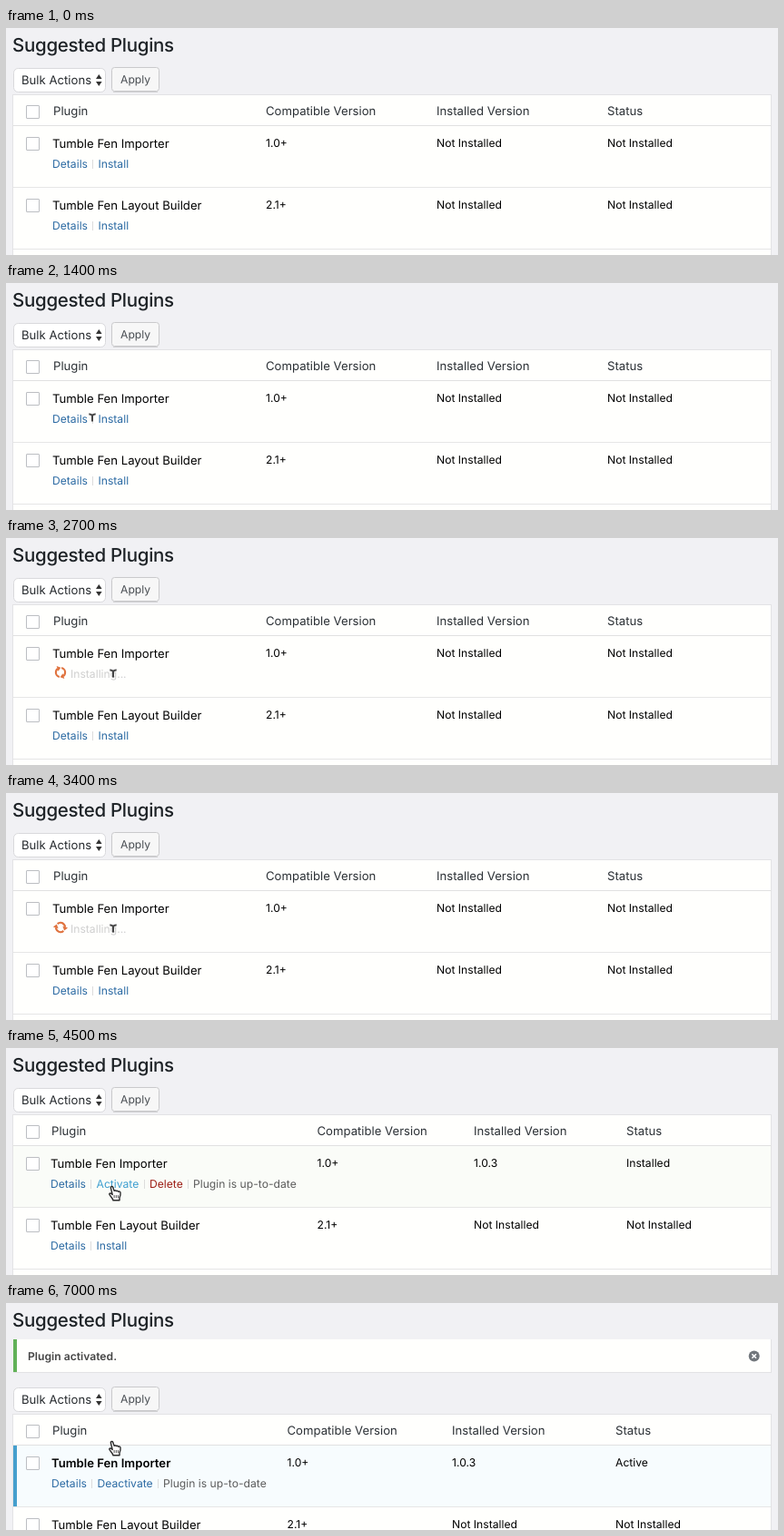
Recreate the animation shown at these times as an HTML page with a canvas. Size 850x250 px, loop 8000 ms.

```html
<!DOCTYPE html>
<html lang="en">
<head>
<meta charset="utf-8">
<title>Suggested Plugins</title>
<style>
html, body { margin: 0; width: 100%; height: 100%; overflow: hidden; background: #f1f1f4; }
canvas { display: block; }
</style>
</head>
<body>
<canvas id="stage" width="850" height="250"></canvas>
<script>
const ctx = document.getElementById('stage').getContext('2d');
const LOOP = 8000, STEP = 100;
const LINK = '#2b6aa3', HOVER = '#3f9fd0', FOCUS = '#1b3f5c', DELETE = '#9c1c14';
const PAPER = '#fffffd', SPIN = '#e0733f';
const BODY = 12.15, LABEL = 13.15;
const BRAND = 'Tumble Fen';

// Column positions: link text, header, version, installed, status
const COLS = {
  fresh: [51, 52, 286, 474, 662],
  installed: [49, 50, 342.5, 515, 683],
  active: [50, 51, 309.5, 491, 671]
};

// Pointer stops, one per step from 1100 ms
const PATH = [[204, 238], [160, 196], [112, 160], [95, 151], [104, 152], [113, 152], [118, 152]];

ctx.textRendering = 'geometricPrecision';

function text(str, x, y, size = BODY, color = '#000', weight = 400) {
  ctx.font = `${weight} ${size}px Inter, Roboto, sans-serif`;
  ctx.fillStyle = color;
  ctx.fillText(str, x, y);
}

function rect(x, y, w, h, color) {
  ctx.fillStyle = color;
  ctx.fillRect(x, y, w, h);
}

function box(x, y, w, h, r, fill, stroke) {
  ctx.beginPath();
  ctx.roundRect(x + 0.5, y + 0.5, w - 1, h - 1, r);
  ctx.fillStyle = fill;
  ctx.fill();
  ctx.lineWidth = 1;
  ctx.strokeStyle = stroke;
  ctx.stroke();
}

function poly(points, color) {
  ctx.beginPath();
  points.forEach(([x, y]) => ctx.lineTo(x, y));
  ctx.closePath();
  ctx.fillStyle = color;
  ctx.fill();
}

function separator(x, y) {
  rect(x, y - 9, 1, 10, '#dcdcdc');
}

function checkbox(y) {
  box(22, y, 15, 15, 0.5, '#fff', '#bcbec2');
}

function controls(dy) {
  box(8, 44 + dy, 102, 27, 5, '#fff', '#d9d9dc');
  text('Bulk Actions', 17, 62 + dy, LABEL, '#25292d');
  poly([[99, 56 + dy], [102.3, 51 + dy], [105.6, 56 + dy]], '#333');
  poly([[99, 59 + dy], [102.3, 64 + dy], [105.6, 59 + dy]], '#333');
  rect(118, 70 + dy, 49, 1, '#d0d0d2');
  box(116, 43 + dy, 53, 27, 3, '#f7f7f7', '#c9c9cb');
  text('Apply', 126, 61 + dy, BODY, '#484d52');
}

function table(dy, cols) {
  rect(7, 73 + dy, 836, 200, '#e3e3e5');
  rect(8, 74 + dy, 834, 200, PAPER);
  checkbox(85 + dy);
  ['Plugin', 'Compatible Version', 'Installed Version', 'Status']
    .forEach((label, i) => text(label, cols[i + 1], 96 + dy, LABEL, '#2b3035'));
  rect(8, 107 + dy, 834, 1, '#e1e1e1');
}

function row(y, cols, name, values, weight) {
  checkbox(y + 12);
  text(name, cols[0], y + 24, LABEL, '#000', weight);
  values.forEach((value, i) => text(value, cols[i + 2], y + 23));
  rect(8, y + 67, 834, 1, '#e6e6e6');
}

function details(x, y) {
  text('Details', x, y, BODY, LINK);
  separator(x + 44, y);
}

function action(label, x, y, state, width) {
  text(label, x, y, BODY, { hover: HOVER, focus: FOCUS }[state] || LINK);
  if (state === 'focus') {
    ctx.lineWidth = 1.5;
    ctx.strokeStyle = '#6596c5';
    ctx.strokeRect(x - 0.5, y - 13, width, 17);
  }
}

function spinner(t) {
  ctx.save();
  ctx.translate(60, 148);
  ctx.rotate((t - 2300) / 2000 * Math.PI * 2);
  ctx.strokeStyle = SPIN;
  ctx.lineWidth = 2.2;
  for (let i = 0; i < 2; i++) {
    ctx.beginPath();
    ctx.arc(0, 0, 5.1, -2.6, -0.35);
    ctx.stroke();
    poly([[1.9, -2], [7.9, -2], [5, 2]], SPIN);
    ctx.rotate(Math.PI);
  }
  ctx.restore();
}

function notice() {
  rect(8, 40, 835, 37, '#e2e2e4');
  rect(8, 40, 834, 36, PAPER);
  rect(8, 40, 4, 36, '#62b158');
  text('Plugin activated.', 24, 63, BODY, '#444', 600);
  ctx.beginPath();
  ctx.arc(823.7, 58.5, 6, 0, Math.PI * 2);
  ctx.fillStyle = '#72777c';
  ctx.fill();
  ctx.beginPath();
  ctx.moveTo(821.4, 56.2); ctx.lineTo(826, 60.8);
  ctx.moveTo(826, 56.2); ctx.lineTo(821.4, 60.8);
  ctx.strokeStyle = '#fff';
  ctx.lineWidth = 1.6;
  ctx.stroke();
}

function outline(shape, fill, stroke) {
  const path = new Path2D(shape);
  ctx.lineJoin = 'round';
  ctx.lineWidth = 1.4;
  ctx.fillStyle = fill;
  ctx.strokeStyle = stroke;
  ctx.fill(path);
  ctx.stroke(path);
}

const cursors = {
  arrow: () => outline('M0 0V12L2.8 9.5L4.8 14L6.8 13.1L4.9 8.8H8.6Z', '#111', '#fff'),
  beam() {
    ctx.strokeStyle = '#454545';
    ctx.lineWidth = 2;
    ctx.beginPath();
    ctx.moveTo(-3.7, -6.6);
    ctx.quadraticCurveTo(-0.6, -6.8, 0, -4.5);
    ctx.quadraticCurveTo(0.6, -6.8, 3.7, -6.6);
    ctx.moveTo(0, -5); ctx.lineTo(0, 1.5);
    ctx.stroke();
  },
  hand() {
    outline('M-2.7 1.8C-2.9.4-.7 0-.2 1.5L1.1 5.4C1.7 4.5 3 4.7 3.4 5.6' +
      'C4.1 4.9 5.3 5.3 5.6 6.2C6.6 5.6 7.9 6.2 8 7.5C8.3 10 7.8 11 7 13V15.8H0' +
      'C-.4 13.7-2.5 11.8-4 9.7C-4.8 8.4-3.2 7.4-2 8.4L-.8 9.5Z', '#fff', '#2a2a2a');
    ctx.beginPath();
    [1.1, 3.3, 5.4].forEach(x => { ctx.moveTo(x, 10); ctx.lineTo(x, 13.2); });
    ctx.lineWidth = 0.8;
    ctx.stroke();
  }
};

function pointer(t) {
  if (t < 1100) return;
  const [x, y] = PATH[Math.min((t - 1100) / STEP, PATH.length - 1)];
  let kind = 'hand';
  if (t < 1400) kind = 'arrow';
  else if (t < 1500 || (t >= 2200 && t < 3900)) kind = 'beam';
  ctx.save();
  ctx.translate(x, y);
  cursors[kind]();
  ctx.restore();
}

function rowBackground(t, dy) {
  if (t >= 7000) {
    rect(8, 108 + dy, 834, 67, '#f7fcfe');
    rect(8, 108 + dy, 4, 67, '#459fcd');
  } else if (t >= 3900) {
    ctx.globalAlpha = Math.max(0, Math.min(1, (4700 - t) / 700));
    rect(8, 108, 834, 67, '#edf5eb');
    ctx.globalAlpha = 1;
  }
}

function firstActions(t, x, y) {
  if (t >= 2300 && t < 3900) {
    spinner(t);
    text('Installing...', 71, y, BODY, '#cfcfcf');
    return;
  }
  details(x, y);
  if (t < 2300) {
    const state = t >= 2200 ? 'focus' : t >= 1500 ? 'hover' : '';
    action('Install', x + 50.5, y, state, 35.5);
  } else if (t < 7000) {
    action('Activate', x + 50.5, y, t >= 5700 ? 'focus' : 'hover', 48.5);
    separator(152, y);
    text('Delete', 158, y, BODY, DELETE);
    separator(200, y);
    text('Plugin is up-to-date', 206, y, BODY, '#5c5c5c');
  } else {
    action('Deactivate', x + 50.5, y);
    separator(167, y);
    text('Plugin is up-to-date', 173, y, BODY, '#5c5c5c');
  }
}

function draw(t) {
  const active = t >= 7000, installed = t >= 3900;
  const cols = active ? COLS.active : installed ? COLS.installed : COLS.fresh;
  const dy = active ? 49 : 0;
  const status = active ? 'Active' : installed ? 'Installed' : 'Not Installed';

  rect(0, 0, 850, 250, '#f1f1f4');
  ctx.letterSpacing = '-0.3px';
  text('Suggested Plugins', 7, 26, 20.5, '#1d2226', 450);
  ctx.letterSpacing = '0px';
  if (active) notice();
  controls(dy);
  table(dy, cols);
  rowBackground(t, dy);
  row(108 + dy, cols, BRAND + ' Importer',
    ['1.0+', installed ? '1.0.3' : 'Not Installed', status], active ? 600 : 400);
  firstActions(t, cols[0], 154 + dy);
  row(176 + dy, cols, BRAND + ' Layout Builder', ['2.1+', 'Not Installed', 'Not Installed']);
  details(cols[0], 222 + dy);
  action('Install', cols[0] + 50.5, 222 + dy);
  pointer(t);
}

function tick() {
  draw(Math.floor(performance.now() % LOOP / STEP) * STEP);
  requestAnimationFrame(tick);
}
tick();
</script>
</body>
</html>
```
